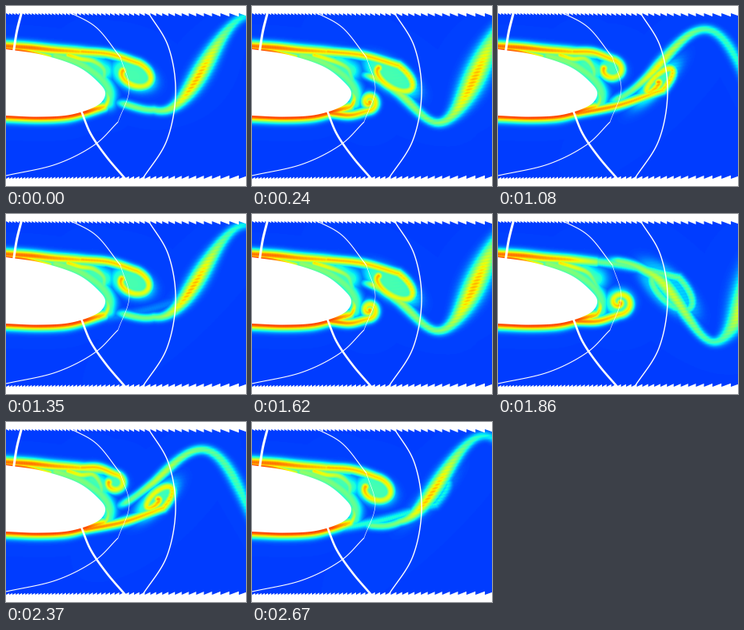
Recreate the animation shown at these times as a matplotlib script. Size 300x225 px, loop 2.7 s.

```python
import numpy as np
import matplotlib.pyplot as plt
from matplotlib.animation import FuncAnimation

W, H, DPI = 300, 225, 100
FRAMES, STEP_MS = 90, 30
PERIOD = 46  # frames per shedding cycle
WAVELENGTH = 216
AXIS_Y = 92  # middle of the wake

X = np.arange(W, dtype=np.float32) + 0.5
Y = np.arange(H, dtype=np.float32) + 0.5
GX, GY = np.meshgrid(X, Y)


def ramp(v, lo, hi):
    return np.clip((v - lo) / (hi - lo), 0, 1)


def curve(points, n=90):
    """Smooth path through a few points (Catmull-Rom)."""
    points = np.asarray(points, float)
    slope = np.gradient(points, axis=0)
    at = np.linspace(0, len(points) - 1, n)
    i = np.minimum(at.astype(int), len(points) - 2)
    u = (at - i)[:, None]
    return ((1 + 2 * u) * (1 - u) ** 2 * points[i] + u * (1 - u) ** 2 * slope[i]
            + u * u * (3 - 2 * u) * points[i + 1] + u * u * (u - 1) * slope[i + 1])


def spread(nodes, n):
    nodes = np.atleast_1d(nodes)
    return np.interp(np.linspace(0, 1, n), np.linspace(0, 1, len(nodes)), nodes)


def brush(field, path, amps, widths):
    """Soft band along a sampled path, keeping the strongest value."""
    n = len(path)
    amp, width = spread(amps, n)[:, None], spread(widths, n)[:, None]
    rows = np.exp(-((X - path[:, :1]) / width) ** 2).astype(np.float32)
    cols = (amp * np.exp(-((Y - path[:, 1:]) / width) ** 2)).astype(np.float32)
    for row, col in zip(rows, cols):
        np.maximum(field, col[:, None] * row, out=field)


def roll_up(field, centre, axes, tilt, spin, turn, tip, feed, amps):
    """Filled ellipse with a sheet that runs in from feed and winds up inside."""
    cx, cy = centre
    a, b = axes
    co, si = np.cos(tilt), np.sin(tilt)
    du = ((GX - cx) * co + (GY - cy) * si) / a
    dv = ((GY - cy) * co - (GX - cx) * si) / b
    rim = (np.hypot(du, dv) - 1) * b / 2.5
    np.maximum(field, 0.5 * amps[1] / (1 + np.exp(np.clip(rim, -30, 30))), out=field)

    s = np.linspace(0, 1, 90)
    angle = spin * (s * turn - np.pi / 2)
    radius = 0.9 + (tip - 0.9) * s
    u, v = a * radius * np.cos(angle), b * radius * np.sin(angle)
    spiral = np.column_stack([cx + u * co - v * si, cy + u * si + v * co])
    start = np.array(feed)
    middle = (start + spiral[0]) / 2 - [0, 4 * spin]
    sheet = curve([start, middle, spiral[0]], 50)
    brush(field, np.vstack([sheet, spiral]), amps, [5.5, 5.5, 6])


def upper_vortex(field, age):
    if not 28 <= age < 70:
        return
    g = (age - 28) / 26
    bulge = np.sin(np.pi * min(g, 1))
    centre = 126 + 48 * g + 3 * max(age - 54, 0), 70 + 18 * g + 5 * bulge
    axes = 8 + 30 * g, 8 + 10 * g + 4 * bulge
    fade = ramp(age, 26, 32) * ramp(age, 70, 56)
    roll_up(field, centre, axes, 0.58 * g, 1, 1.5 * np.pi, 0.5, (95, 57),
            fade * np.array([0.7, 0.66, 0.58, 0.72]))


def lower_vortex(field, age):
    if not 2 <= age < 46:
        return
    g = min((age - 2) / 22, 1)
    late = max(age - 24, 0)
    centre = 142 + 15 * g + 3.4 * late, 127 - 26 * g - 0.3 * late
    axes = 6 + 19 * g + 0.9 * late, max(6 + 17 * g - late, 12)
    fade = ramp(age, 0, 6) * ramp(age, 46, 38)
    tilt = -0.8 * ramp(age, 16, 34)
    roll_up(field, centre, axes, tilt, -1, 2.4 * np.pi, 0.1, (100, 134),
            fade * np.array([0.8, 0.66, 0.6, 0.74]))


def wake_wave(field, phase):
    """Downstream sheet: a growing travelling wave with vortices on its flanks."""
    x = np.linspace(138, 325, 230)
    phi = 2 * np.pi * ((x - 200) / WAVELENGTH - (phase - 24) / PERIOD)
    phi += 0.13 * (1 - np.sin(phi)) + 0.9 * np.exp(-(x - 140) / 40)
    y = AXIS_Y - (38 + 0.36 * np.maximum(x - 185, 0)) * np.cos(phi)
    rising = np.exp(3 * (-np.sin(phi) - 1)) * ramp(x, 165, 200)
    falling = np.exp(3 * (np.sin(phi) - 1)) * ramp(x, 340, 260)
    base = 0.4 - 0.24 * ramp(x, 235, 315)
    amp = (base + (0.68 - base) * rising + 0.14 * falling) * ramp(x, 134, 150)
    width = 5 + (2 + 0.08 * (x - 200)) * rising + 4 * falling * ramp(x, 150, 210)
    brush(field, np.column_stack([x, y]), amp, width)


def attached_layers():
    field = np.zeros((H, W), np.float32)
    top = curve([(-4, 50), (30, 52), (60, 55), (90, 57), (122, 60)])
    brush(field, top, [0.8, 0.8, 0.74, 0.68, 0.5], [6.5, 6.5, 6])
    brush(field, curve([(-4, 54), (25, 57), (55, 63)]), [0.9, 0.82, 0.55], 4)
    below = curve([(-4, 137.5), (40, 139), (75, 137.5), (100, 132), (122, 126)])
    brush(field, below, [0.86, 0.88, 0.86, 0.86, 0.66], [7, 7, 6])
    lee = curve([(62, 62), (85, 69), (104, 79), (120, 92), (129, 107), (128, 121)])
    brush(field, lee, [0.45, 0.36], [8, 9])
    brush(field, curve([(108, 72), (122, 81)], 12), 0.33, 14)
    return field


ATTACHED = attached_layers()


def wake(phase):
    field = ATTACHED.copy()
    s, c = np.sin(2 * np.pi * phase / PERIOD), np.cos(2 * np.pi * phase / PERIOD)
    eddy = curve([(78, 61), (93, 66), (109, 69 + 3 * s), (119 + 3 * c, 79), (122 + 3 * s, 92)], 40)
    brush(field, eddy, [0.65, 0.58, 0.46, 0.36], 5)
    brush(field, curve([(116, 129), (124, 125), (128, 116), (126, 108)], 25),
          [0.72, 0.58 + 0.1 * s, 0.38], 4)
    wake_wave(field, phase)
    for age in (phase, phase + PERIOD):
        upper_vortex(field, age)
        lower_vortex(field, age)
    # faint ridges of the coarse downstream mesh
    ridge = np.sin(np.pi * (GY + 0.15 * GX) / 2)
    field = field * (1 + 0.05 * ridge * ramp(GX, 170, 230))
    return 0.1875 + 0.75 * field


def teeth(edge, sign):
    """Saw-toothed white margin whose teeth grow to the right."""
    outer = -1 if sign > 0 else H + 1
    pts, x = [(-1, outer), (-1, edge)], 0.0
    while x < W:
        pitch = 4 + 9 * (x / W) ** 2
        pts += [(x, edge), (x + pitch, edge + sign * (2 + 2.5 * x / W))]
        x += pitch
    return pts + [(x, outer)]


fields = [wake(p) for p in range(PERIOD)]

fig = plt.figure(figsize=(W / DPI, H / DPI), dpi=DPI, facecolor="white")
ax = fig.add_axes([0, 0, 1, 1])
image = ax.imshow(fields[0], cmap="jet", vmin=0, vmax=1, extent=(0, W, H, 0),
                  interpolation="nearest", aspect="auto")
ax.set_xlim(0, W)
ax.set_ylim(H, 0)
ax.axis("off")


def seam(points, px):
    ax.plot(*curve(points).T, color="white", lw=px * 72 / DPI, solid_capstyle="butt")


seam([(19.5, 8), (13.5, 32), (9.5, 57)], 3)
seam([(94, 131), (106, 160), (126, 189), (150, 217)], 2.6)
seam([(78, 7), (113, 27), (143, 64)], 1.1)
seam([(143, 64), (154, 104), (140, 145)], 0.6)
seam([(140, 145), (110, 174), (62, 198), (0, 212)], 1.1)
seam([(177, 7), (203, 51), (212, 108), (201, 168), (170, 217)], 1.4)

body = curve([(0, 54), (45, 61), (90, 76), (117, 97), (124, 111), (113, 125),
              (80, 136), (40, 138.5), (0, 137)], 160)
ax.fill(*np.vstack([(-2, 54), body, (-2, 137)]).T, color="white", lw=0)
for margin in (teeth(9, 1), teeth(216, -1)):
    ax.fill(*np.array(margin).T, color="white", lw=0)


def update(i):
    image.set_data(fields[i % PERIOD])
    return [image]


anim = FuncAnimation(fig, update, frames=FRAMES, interval=STEP_MS, repeat=True, repeat_delay=0)
plt.show()
```
